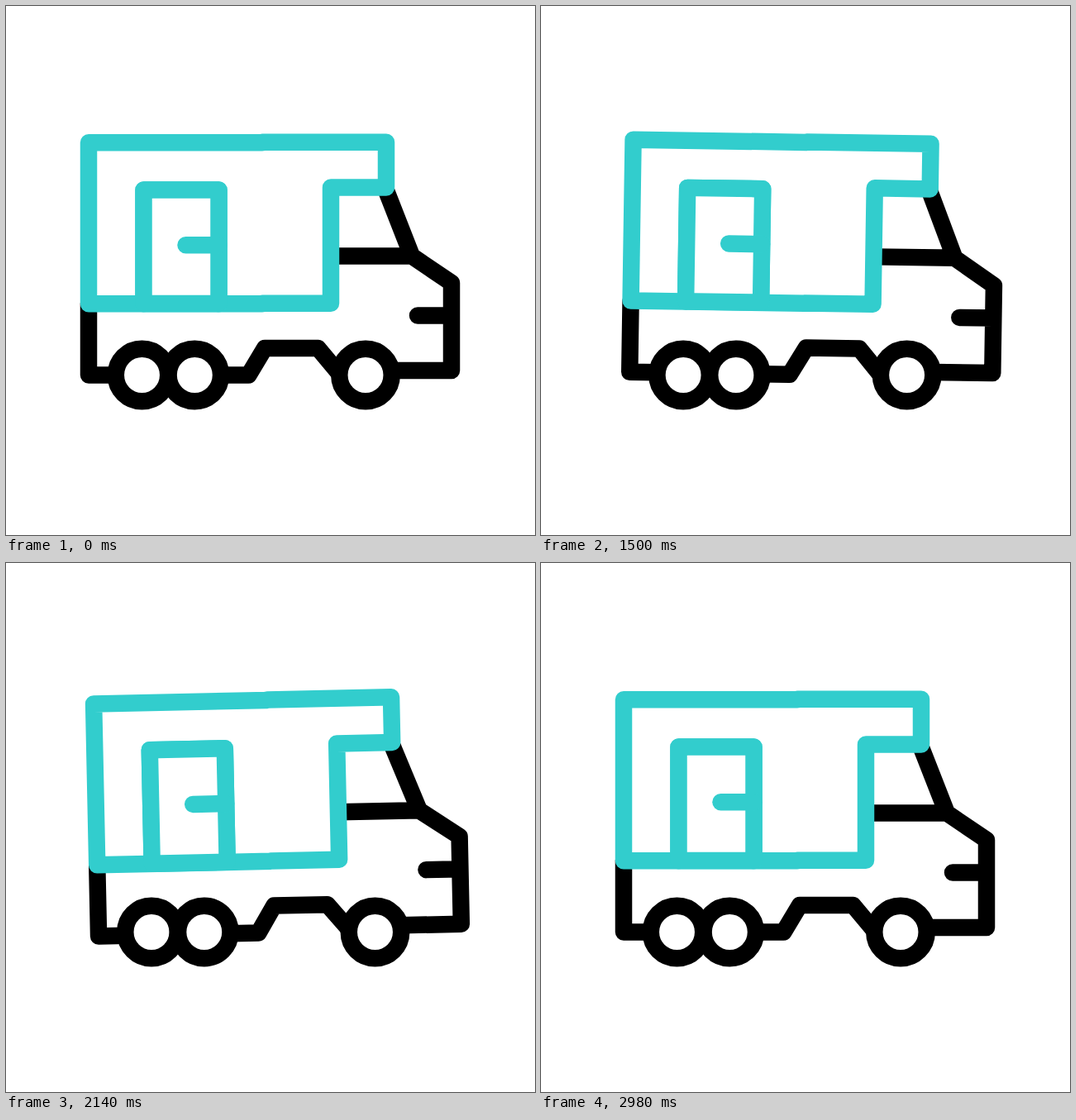
Animation, 640 px wide and 640 px high, one loop 3.6 s. Source, as an HTML page:

```html
<!DOCTYPE html>
<html lang="en">
<head>
<meta charset="utf-8">
<title>Camper van</title>
<style>
  html, body { margin: 0; width: 100%; height: 100%; overflow: hidden; background: #fff; }
  svg { display: block; width: 100%; height: 100%; fill: none; stroke: #000; stroke-width: 20.5; stroke-linecap: round; stroke-linejoin: round; }
  .teal { stroke: #32cdcd; }
  .white { fill: #fff; }
</style>
</head>
<body>
<svg viewBox="0 0 640 640">
  <g id="van">
    <g id="body">
      <path d="M100 360V446.5H133M260 446.5H293.500L313 414H377.500L403 444.500M467 441H539V335L491 302.500H394M459.500 222L491 302.500M498 374.500H539"/>
      <g class="teal">
        <path d="M310 165.300H100V360.200H310M310 164.800H460V219.500H393V359.800H310"/>
        <path d="M166.500 360V222.500H257.500V360"/>
        <path id="door" class="white"/>
        <path id="handle"/>
      </g>
    </g>
    <g class="white">
      <circle cx="164.500" cy="446.500" r="31.700"/>
      <circle cx="228.300" cy="446.500" r="31.700"/>
      <circle cx="435" cy="446.500" r="31.700"/>
    </g>
  </g>
</svg>
<script>
  const LOOP = 3600;
  const PIVOT = "338 422";
  const [van, body, door, handle] = ["van", "body", "door", "handle"].map(id => document.getElementById(id));

  // Tracks are [time, value] pairs joined by sine easing.
  const opening = [[0, 0], [640, 1], [800, 1], [1285, 0]];
  const shift = [[1335, 0], [1950, 45], [2408, -45.3], [2840, 0]];
  const tilt = [[1335, 0], [1858, 3.85], [2180, -1.4], [2520, 0.87], [2980, 0]];

  const mix = (a, b, p) => a + (b - a) * p;

  function valueAt(track, t) {
    const next = track.findIndex(key => key[0] > t);
    if (next === 0) return track[0][1];
    if (next < 0) return track[track.length - 1][1];
    const [t0, v0] = track[next - 1];
    const [t1, v1] = track[next];
    return mix(v0, v1, (1 - Math.cos(Math.PI * (t - t0) / (t1 - t0))) / 2);
  }

  function draw(t) {
    const open = valueAt(opening, t);
    const edge = mix(257.5, 205, open);
    const drop = 34 * open;
    door.setAttribute("d", `M166.5 222.5L${edge} ${222.5 + drop}V${360 + drop}L166.5 360Z`);
    handle.setAttribute("d", `M${mix(217.5, 190.5, open)} ${mix(289.3, 313, open)}L${edge} ${mix(289.3, 320, open)}`);
    van.setAttribute("transform", `translate(${valueAt(shift, t)} 0)`);
    body.setAttribute("transform", `rotate(${valueAt(tilt, t)} ${PIVOT})`);
  }

  const start = performance.now();
  function frame() {
    draw((performance.now() - start) % LOOP);
    requestAnimationFrame(frame);
  }
  frame();
</script>
</body>
</html>
```
